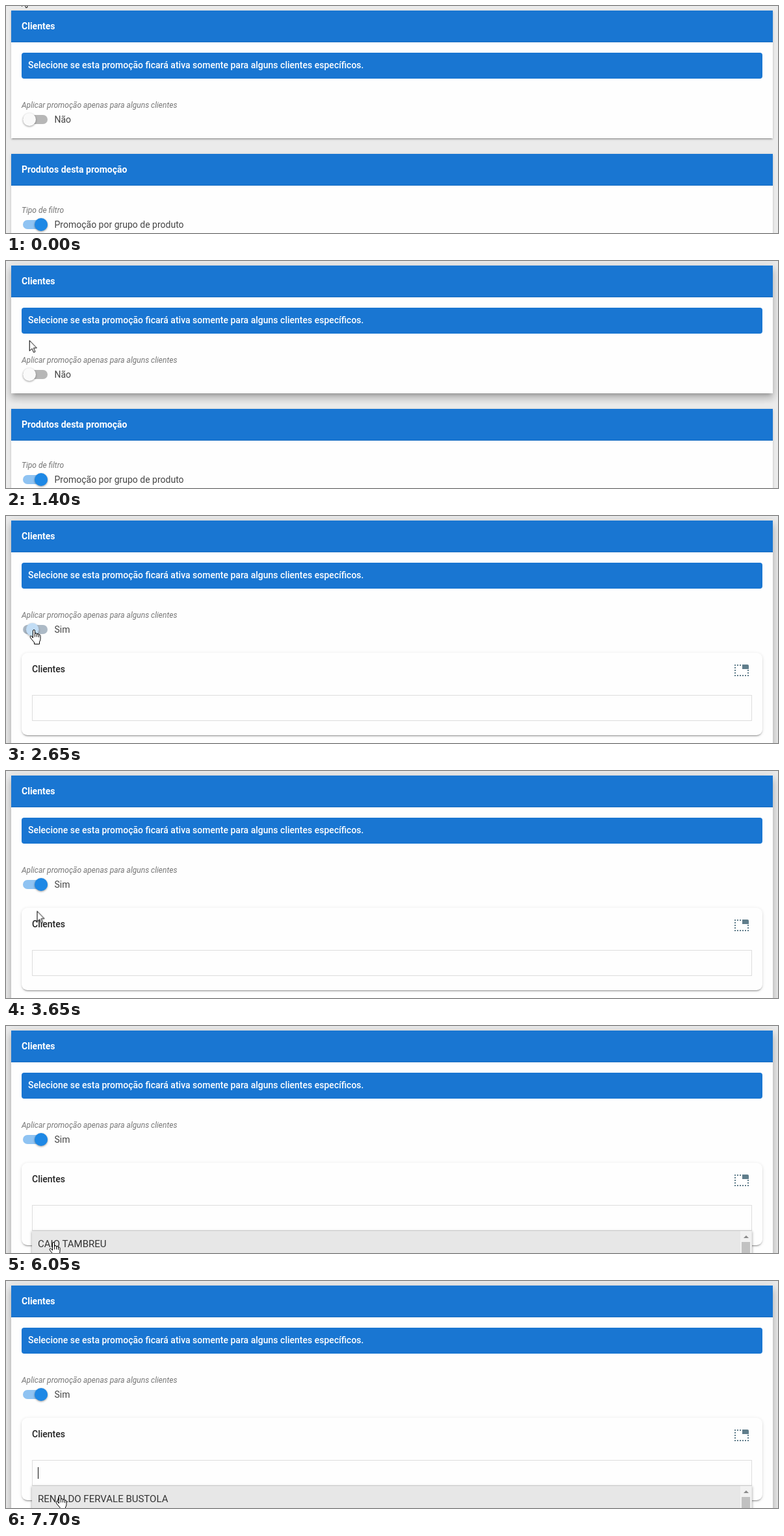
Animation, 1188 px wide and 350 px high, one loop 8 s. Source, as an HTML page:

```html
<!DOCTYPE html>
<html lang="pt-BR">
<head>
<meta charset="utf-8">
<title>Promoção</title>
<style>
  :root {
    --blue: #1976d2;
    --low: 0 3px 1px -2px rgba(0,0,0,.2), 0 2px 2px 0 rgba(0,0,0,.14), 0 1px 5px 0 rgba(0,0,0,.12);
    --high: 0 5px 5px -3px rgba(0,0,0,.2), 0 8px 10px 1px rgba(0,0,0,.14), 0 3px 14px 2px rgba(0,0,0,.12);
  }
  * { box-sizing: border-box; }
  html, body { margin: 0; width: 100%; height: 100%; overflow: hidden; }
  body { position: relative; background: #ebebeb; font: 14px/20px Roboto, sans-serif; color: #444; }
  div, svg, span { position: absolute; white-space: nowrap; }

  .card { left: 8px; width: 1172px; background: #fefefe; box-shadow: var(--low); }
  .head { left: 0; top: 0; width: 100%; height: 49px; padding: 14px 16px; background: var(--blue);
          border-bottom: 1px solid #166bc0; color: #fff; font-weight: 700; }
  .alert { left: 16px; top: 65px; width: 1140px; height: 40px; padding: 9px 10px; border-radius: 4px;
           background: var(--blue); color: #fff; font-weight: 500; }
  .hint { left: 16px; font-size: 12px; font-style: italic; color: #757575; }
  .label { left: 66.5px; }

  .track { left: 18px; width: 38px; height: 14px; border-radius: 7px; background: #8fc3f2; }
  .thumb { left: 0; top: -3px; width: 20px; height: 20px; border-radius: 50%; background: #1e88e5;
           transform: translateX(18px); box-shadow: 0 1px 3px rgba(0,0,0,.4); }

  .panel { left: 16px; top: 204px; width: 1140px; height: 127px; border-radius: 9px; background: #fefefe;
           box-shadow: var(--low); }
  .panel .title { left: 16px; top: 15px; font-weight: 500; color: #222; }
  .field { left: 16px; top: 65px; width: 1108px; height: 40px; border: 1px solid #ddd; }
  .caret { left: 8px; top: 10px; width: 1px; height: 18px; background: #111; }
  .typed { left: 8px; top: 9px; font-size: 15px; color: #333; }
  .menu { left: 16px; top: 105px; width: 1108px; height: 200px; background: #e7e7e7;
          box-shadow: 0 1px 4px rgba(0,0,0,.4); font-size: 15px; color: #333; }
  .menu span { left: 9px; top: 10px; }
  .bar { right: 1px; top: 0; width: 17px; height: 100%; background: #f1f1f1; }
  .bar::before { content: ""; position: absolute; left: 4.5px; top: 7px; border: 4px solid transparent;
                 border-top: 0; border-bottom: 4px solid #8a8a8a; }
  .bar::after { content: ""; position: absolute; left: 2px; top: 17px; width: 13px; height: 100%; background: #c1c1c1; }

  .cursor { left: 0; top: 0; }
  .cursor svg { overflow: visible; width: 20px; height: 24px; fill: #fff; stroke: #000; stroke-linejoin: round; }

  /* Shared 8 s timeline: 1% = 80 ms */
  .main, .thumb.live, .track.live, .cursor { animation: 8s linear infinite; }
  .main { animation-name: hover, grow; animation-timing-function: cubic-bezier(.4,0,.2,1), step-end; }
  .thumb.live { animation-name: slide; }
  .track.live { animation-name: tint; }
  .cursor { animation-name: travel; }
  .before, .after, .caret, .typed, .menu, .first, .second, .arrow, .hand, .beam { animation: 8s step-end infinite; }
  .before { animation-name: before; }
  .after { animation-name: after; }
  .caret { animation-name: blink; }
  .typed { animation-name: typed; }
  .menu { animation-name: open; }
  .first { animation-name: first; }
  .second { animation-name: second; }
  .arrow { animation-name: arrow; }
  .hand { animation-name: hand; }
  .beam { animation-name: beam; }

  @keyframes hover { 0%, 8.75% { box-shadow: var(--low); } 12.5%, 100% { box-shadow: var(--high); } }
  @keyframes grow { 0% { height: 197px; } 33.125%, 100% { height: 420px; } }
  @keyframes slide {
    0%, 32.5% { transform: none; background: #fafafa; }
    35%, 100% { transform: translateX(18px); background: #1e88e5; }
  }
  @keyframes tint { 0%, 32.5% { background: #b7b7b7; } 35%, 100% { background: #8fc3f2; } }
  @keyframes before { 0% { opacity: 1; } 33.125%, 100% { opacity: 0; } }
  @keyframes after { 0% { opacity: 0; } 33.125%, 100% { opacity: 1; } }
  @keyframes blink {
    0%, 63.125%, 75.625%, 89.375% { opacity: 0; }
    56.875%, 69.375%, 82.5%, 96.25%, 100% { opacity: 1; }
  }
  @keyframes open { 0% { opacity: 0; } 59.375%, 100% { opacity: 1; } }
  @keyframes typed { 0%, 78.75%, 100% { opacity: 0; } 78.125% { opacity: 1; } }
  @keyframes first { 0% { opacity: 1; } 78.75%, 100% { opacity: 0; } }
  @keyframes second { 0% { opacity: 0; } 78.75%, 100% { opacity: 1; } }
  @keyframes arrow { 0%, 43.75% { opacity: 1; } 23.125%, 50.9%, 100% { opacity: 0; } }
  @keyframes hand { 0%, 43.75% { opacity: 0; } 23.125%, 67.2%, 100% { opacity: 1; } }
  @keyframes beam { 0%, 67.2%, 100% { opacity: 0; } 50.9% { opacity: 1; } }
  @keyframes travel {
    0% { transform: translate(24px, -16px); }
    6.25% { transform: translate(24px, -16px); animation-timing-function: cubic-bezier(.4,.2,.7,.6); }
    10.625% { transform: translate(24px, 28px); }
    16.875% { transform: translate(35px, 115px); animation-timing-function: cubic-bezier(.33,.67,.67,1); }
    27.5% { transform: translate(41px, 175px); }
    43.125% { transform: translate(41px, 175px); animation-timing-function: cubic-bezier(.33,.48,.67,1); }
    53.75%, 64.375% { transform: translate(60px, 294px); }
    69.375%, 81.875% { transform: translate(71px, 333px); }
    86.25%, 88.75% { transform: translate(80px, 335px); }
    92.5% { transform: translate(87px, 333px); }
    96.25%, 100% { transform: translate(81px, 330px); }
  }
</style>
</head>
<body>
  <div class="card before" style="top:228px; height:200px">
    <div class="head">Produtos desta promoção</div>
    <div class="hint" style="top:77px">Tipo de filtro</div>
    <div class="track" style="top:102px"><div class="thumb"></div></div>
    <div class="label" style="top:99px">Promoção por grupo de produto</div>
  </div>

  <div class="card main" style="top:7px">
    <div class="head">Clientes</div>
    <div class="alert">Selecione se esta promoção ficará ativa somente para alguns clientes específicos.</div>
    <div class="hint" style="top:136px">Aplicar promoção apenas para alguns clientes</div>
    <div class="track live" style="top:161px"><div class="thumb live"></div></div>
    <div class="label before" style="top:158px">Não</div>
    <div class="label after" style="top:158px">Sim</div>

    <div class="panel after">
      <div class="title">Clientes</div>
      <svg style="left:1097px; top:18px" width="22" height="18" fill="none" stroke="#607d8b" stroke-width="2">
        <path d="M0 1H12M0 17H22M1 0V18M21 8V18" stroke-dasharray="2 2"/>
        <path d="M12 0H20Q22 0 22 2V7H12Z" fill="#607d8b" stroke="none"/>
      </svg>
      <div class="field">
        <div class="typed">CAIO TAMBREU</div>
        <div class="caret"></div>
      </div>
      <div class="menu">
        <span class="first">CAIO TAMBREU</span>
        <span class="second">RENALDO FERVALE BUSTOLA</span>
        <div class="bar"></div>
      </div>
    </div>
  </div>

  <div class="cursor">
    <svg class="arrow"><path d="M.5 .5V16.5L4.2 13L6.8 18.8L9.2 17.8L6.7 12H11.5Z"/></svg>
    <svg class="hand" style="left:-5px; top:0">
      <path d="M5.5 13V2Q5.5 .5 7 .5T8.5 2V7Q8.7 5.5 10 5.5T11.5 7V8Q11.8 6.5 13 6.5T14.4 8V9Q14.8 7.8 15.8 7.9T17 9.5V14.5Q17 17 15.5 19V22.5H7.5V20L2.5 14Q.2 11.2 1.5 10.3T4 11Z"/>
      <path d="M8.5 7V11.5M11.5 8V11.5M14.4 9V12" fill="none"/>
    </svg>
    <svg class="beam" style="left:-3px; top:-8px">
      <path d="M0 .5H2.5L3.5 1.5L4.5 .5H7M0 15.5H2.5L3.5 14.5L4.5 15.5H7M3.5 1V15" fill="none" stroke="#e9e9e9"/>
    </svg>
  </div>
</body>
</html>
```
